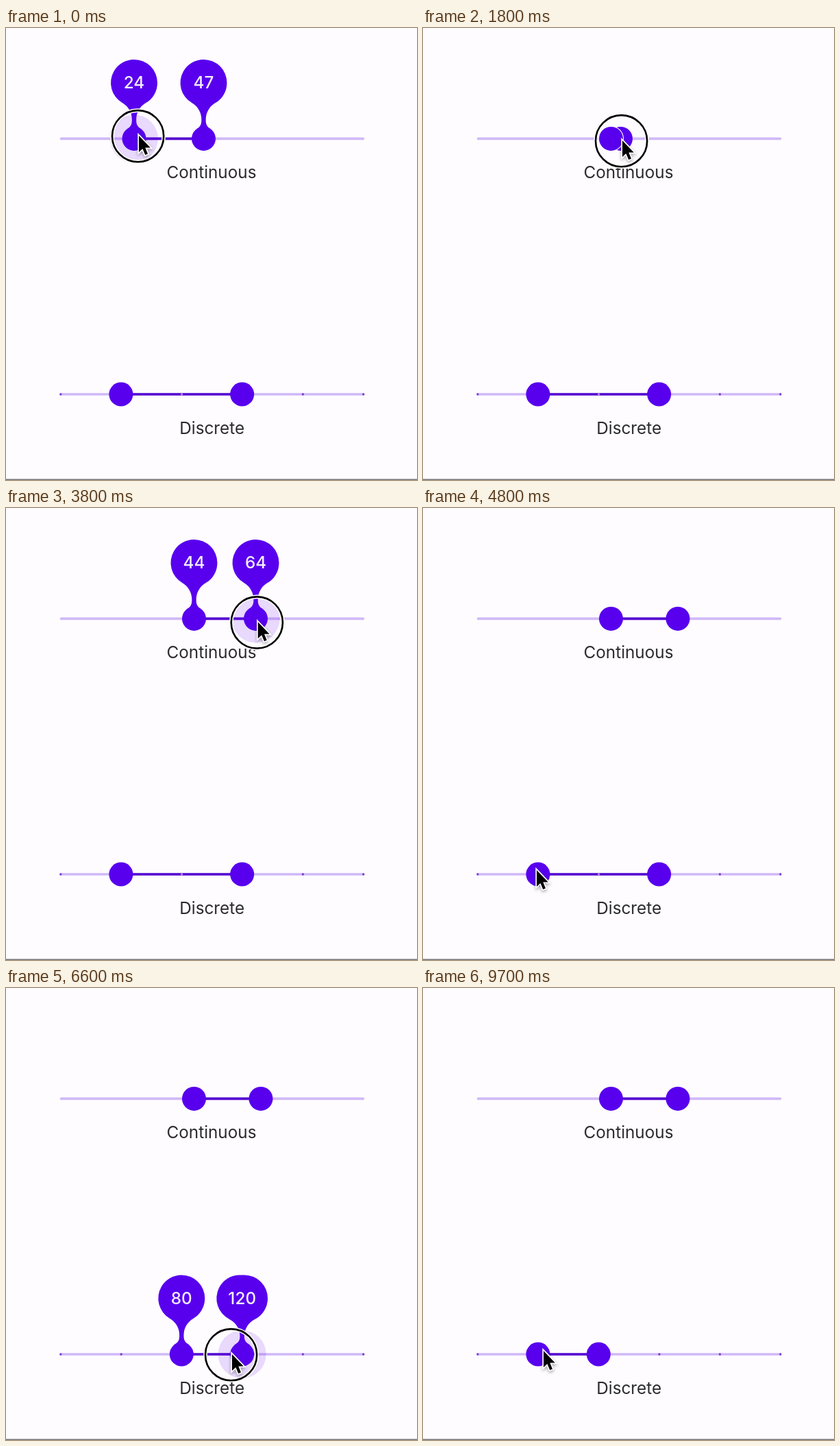
Write an HTML page with a canvas that moves like this. It is 600 px wide and 659 px high and loops after 9900 ms.

```html
<!DOCTYPE html>
<html lang="en">
<head>
<meta charset="utf-8">
<title>Range sliders</title>
<style>
html, body { margin: 0; width: 100%; height: 100%; overflow: hidden; background: #fefcff; }
canvas { display: block; width: 600px; height: 659px; }
</style>
</head>
<body>
<canvas id="stage" width="600" height="659"></canvas>
<script>
const ctx = document.getElementById('stage').getContext('2d');
const LOOP = 9900, STEP = 100;
const X0 = 79.5, X1 = 521.5, GAP = (X1 - X0) / 5;
const BG = '#fefcff', MAIN = '#5800ee', ACTIVE = '#5505cf', TRACK = '#d1b8f8', INK = '#2b2a2e';
const SIZE = '24.3px Inter, Roboto, sans-serif';
const THUMB_R = 17.5, UNIT = 2.125;
const H = Math.PI / 2;

// pointer moves: start, end, x, y; it rests in between
const home = [193, 158];
const moves = [
  [0, 1200, 290, 165], [1900, 2700, 327, 169], [2700, 4000, 374, 167],
  [4200, 4700, 165, 529], [5000, 6000, 256, 535], [6000, 6200, 345, 536],
  [6400, 6600, 329, 535], [6600, 7700, 259, 535],
  [8400, 9100, 170, 530], [9300, 9600, 175, 530]
];

// presses: start, end, slider row, thumb
const presses = [
  [-500, 1400, 0, 0], [1800, 4100, 0, 1],
  [4900, 6000, 1, 0], [6300, 7900, 1, 1], [8300, 9300, 1, 0]
];

const clamp = (v, a, b) => Math.min(b, Math.max(a, v));

function pointer(t) {
  let [x, y] = home;
  for (const [a, b, tx, ty] of moves) {
    const p = clamp((t - a) / (b - a), 0, 1);
    x += (tx - x) * p;
    y += (ty - y) * p;
  }
  return [x, y];
}

function continuous(t, cx) {
  return [
    t < 1400 ? Math.min(cx - 6, 274.5) : 274.5,
    t < 1800 ? 288.5 : t < 4100 ? clamp(372 - (374 - cx) * 1.03, 288.5, 372) : 372
  ];
}

function discrete(t, cx) {
  const snap = clamp(Math.round((cx - X0) / GAP), 1, 3);
  let lo = 1, hi = 3;
  if (t >= 4900) lo = t < 6000 ? snap : 2;
  if (t >= 6300) hi = t < 7900 ? snap : 2;
  if (t >= 8300) lo = t < 9300 ? Math.min(2, snap) : 1;
  return [lo, hi].map(k => X0 + k * GAP);
}

function disc(x, y, r, color) {
  ctx.fillStyle = color;
  ctx.beginPath();
  ctx.arc(x, y, r, 0, 4 * H);
  ctx.fill();
}

function bar(a, b, y, color, cap) {
  ctx.strokeStyle = color;
  ctx.lineWidth = 3.6;
  ctx.lineCap = cap;
  ctx.beginPath();
  ctx.moveTo(a, y);
  ctx.lineTo(b, y);
  ctx.stroke();
}

function write(str, x, y, font, color) {
  ctx.font = font;
  ctx.fillStyle = color;
  ctx.textAlign = 'center';
  ctx.fillText(str, x, y);
}

// drop-shaped value label: a lobe, a neck and a foot tangent to the thumb
function dropPath(shift) {
  const R = 16, top = -38.35, neckR = 13, footR = 6, waist = 1.5;
  const neckX = neckR + waist, footX = footR + waist;
  const th = Math.asin((neckX - shift) / (R + neckR));
  const neckY = top + Math.cos(th) * (R + neckR);
  const fa = Math.acos(footX / (THUMB_R / UNIT + footR));
  const footY = -footX * Math.tan(fa);
  ctx.beginPath();
  ctx.moveTo(0, 0);
  ctx.arc(-footX, footY, footR, fa, 0, true);
  ctx.arc(-neckX, neckY, neckR, 0, -H + th, true);
  ctx.arc(-shift, top, R, H + th, 3 * H);
  ctx.arc(shift, top, R, -H, H - th);
  ctx.arc(neckX, neckY, neckR, -H - th, -2 * H, true);
  ctx.arc(footX, footY, footR, 2 * H, 2 * H - fa, true);
  ctx.closePath();
}

function label(x, y, value, scale, outlined) {
  const font = '500 ' + SIZE;
  ctx.font = font;
  const half = ctx.measureText(value).width / 2 / UNIT;
  ctx.save();
  ctx.translate(x, y);
  ctx.scale(scale, scale);
  ctx.save();
  ctx.scale(UNIT, UNIT);
  dropPath(Math.max(0, half - 8));
  ctx.restore();
  if (outlined) {
    ctx.strokeStyle = '#fff';
    ctx.lineWidth = 2.6;
    ctx.stroke();
  }
  ctx.fillStyle = MAIN;
  ctx.fill();
  write(value, 0, -73.5, font, '#f6efff');
  ctx.restore();
}

function slider(y, row, xs, max, t) {
  const press = presses.filter(p => p[2] === row && p[0] < t).pop();
  let on = 0, top = 1;
  if (press) {
    const [a, b] = press;
    on = clamp(t < b ? (t - a) / 200 : 1 - (t - b) / 200, 0, 1);
    top = press[3];
  }
  const order = [1 - top, top], dist = xs[1] - xs[0];

  bar(X0 + 1, X1, y, TRACK, 'round');
  bar(xs[0], xs[1], y, ACTIVE, 'butt');
  disc(xs[top], y, 35 * on, 'rgba(98,0,238,0.14)');
  for (let x = X0; row && x <= X1; x += GAP) {
    disc(x + 0.3, y, 1.7, x > xs[0] && x < xs[1] ? '#b48cf5' : '#7c3fcf');
  }
  for (const i of order) {
    if (i === top && dist > 0 && dist < 2 * THUMB_R) disc(xs[i], y, THUMB_R + 1.1, '#fff');
    disc(xs[i], y, THUMB_R, MAIN);
  }
  if (!on) return;
  for (const i of order) {
    const value = Math.round((xs[i] - X0) / (X1 - X0) * max);
    label(xs[i], y, String(value), on, i === top && dist > 0 && dist < 70);
  }
}

function ring(x, y) {
  ctx.beginPath();
  ctx.arc(x, y, 37.6, 0, 4 * H);
  for (const [color, width] of [['#fff', 5.6], ['#000', 2.6]]) {
    ctx.strokeStyle = color;
    ctx.lineWidth = width;
    ctx.stroke();
  }
}

function arrow(x, y) {
  ctx.save();
  ctx.translate(x, y);
  ctx.shadowColor = 'rgba(0,0,0,0.35)';
  ctx.shadowBlur = 4;
  ctx.shadowOffsetY = 2;
  const shape = new Path2D('M0 0V24L5.4 19L9.2 28L13 26.4L9.3 17.5H16.8Z');
  ctx.strokeStyle = '#fff';
  ctx.lineWidth = 3.4;
  ctx.stroke(shape);
  ctx.shadowColor = 'transparent';
  ctx.fillStyle = '#000';
  ctx.fill(shape);
  ctx.restore();
}

function draw(t) {
  const [cx, cy] = pointer(t);
  ctx.fillStyle = BG;
  ctx.fillRect(0, 0, 600, 659);
  ctx.fillStyle = '#777';
  ctx.fillRect(0, 657.5, 600, 1.5);
  write('Continuous', 300, 219, SIZE, INK);
  write('Discrete', 300.7, 591.5, SIZE, INK);
  slider(161.4, 0, continuous(t, cx), 100, t);
  slider(534, 1, discrete(t, cx), 200, t);
  if (presses.some(p => t >= p[0] && t < p[1])) ring(cx - 0.4, cy - 0.3);
  arrow(cx + 1, cy - 1);
}

const start = performance.now();
function frame() {
  const t = (performance.now() - start) % LOOP;
  draw(Math.floor(t / STEP) * STEP);
  requestAnimationFrame(frame);
}
frame();
</script>
</body>
</html>
```
